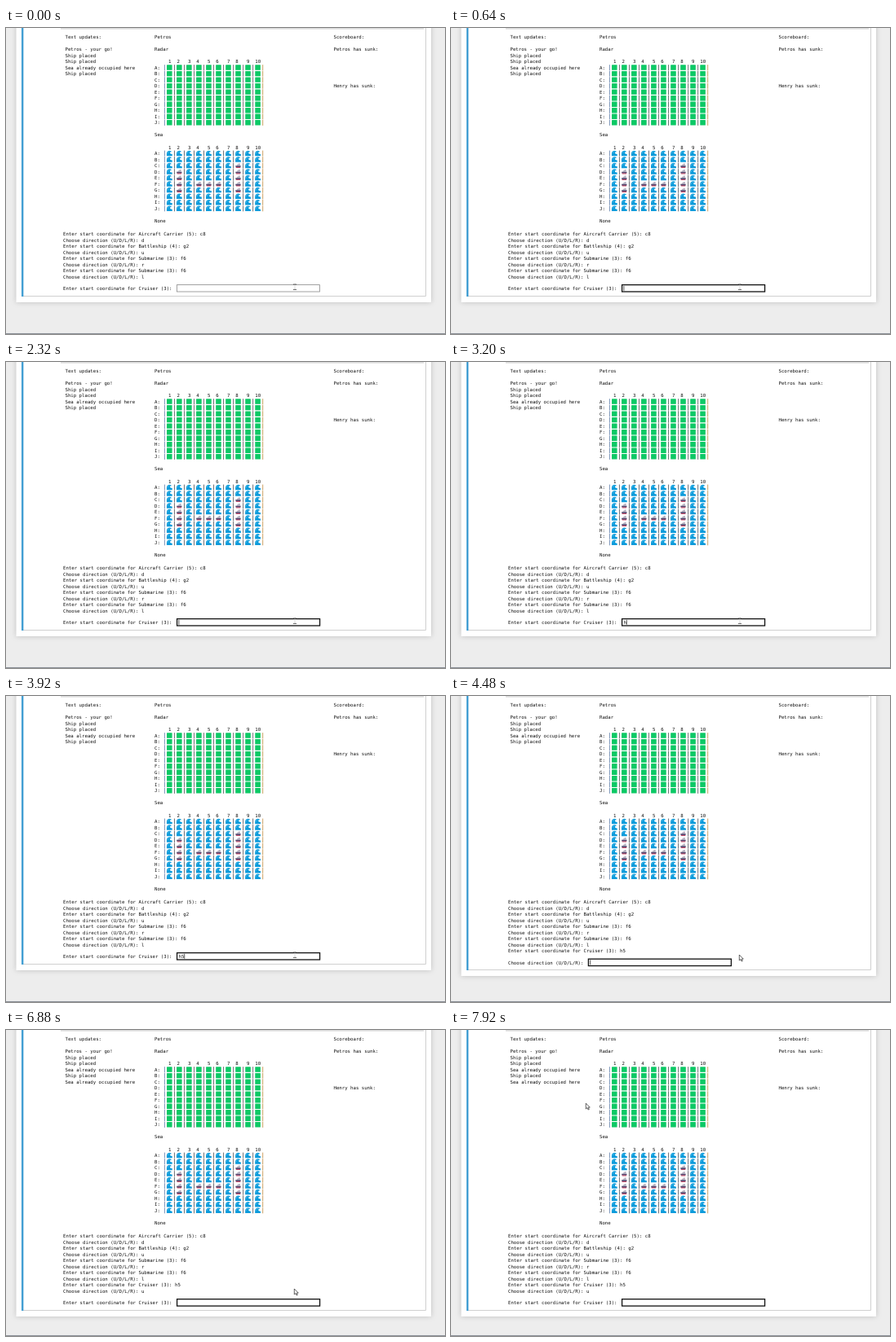
Recreate the animation shown at these times as an HTML page. Size 538 px wide and 376 px high, loop 8 s.

```html
<!DOCTYPE html>
<html>
<head>
<meta charset="utf-8">
<style>
html, body { margin: 0; width: 100%; height: 100%; overflow: hidden; background: #ededed; }
svg { display: block; }
text { font: 5.7px "DejaVu Sans Mono", monospace; white-space: pre; text-rendering: geometricPrecision; fill: #111; }
#panel { fill: #fff; filter: drop-shadow(0 0 3px rgba(87, 87, 87, .3)); }
</style>
</head>
<body>
<svg width="538" height="376" viewBox="0 0 538 376">
  <defs>
    <rect id="square" x="1" y=".9" width="6.6" height="6.4" rx=".5" fill="#0cc965"/>
    <g id="wave">
      <path d="M.9 7.3V4.4Q1.2 1 4.6.8Q6.6.8 7 2.4Q4.9 2 4.9 3.7Q5.2 5.1 7.7 5V7.3Z" fill="#0c9bdb"/>
      <path d="M2.1 4.6Q2.3 2.2 4.4 1.8" fill="none" stroke="#5cc4ee" stroke-width=".6"/>
    </g>
    <g id="ship">
      <path d="M2.3 4.2L3 2.8H4.2L4.6 1.6H6.6V4.2Z" fill="#b5b0c0"/>
      <path d="M.9 4.2H7.7L7 6.4H1.6Z" fill="#55486f"/>
      <path d="M1.4 6H7.2L6.9 7H1.8Z" fill="#d0506c"/>
    </g>
  </defs>
  <rect id="panel" x="12.5" y="-20" width="508.5"/>
  <path id="frame" fill="none" stroke="#d0d0d0"/>
  <rect id="bar" x="19" width="2.4" fill="#439fd3"/>
  <path d="M67 .9H512" stroke="#c8c8c8"/>
  <path d="M0 375.5H538" stroke="#8d9299"/>
  <g id="board"></g>
  <g id="live"></g>
  <g id="beam" fill="none" stroke="#333" stroke-width=".8">
    <path d="M352 315H356M352 321.4H356"/>
    <path d="M354 315V321.4" stroke="#bbb" stroke-width=".5"/>
  </g>
  <path id="arrow" d="M0 0V7L1.7 5.5L2.8 8L4 7.5L2.9 5.1H5Z" fill="#fff" stroke="#222" stroke-width=".7"/>
</svg>
<script>
const $ = id => document.getElementById(id);
const LOOP = 8000, LINE = 7.53, CHAR = 3.432, PITCH = 12.03;
const ROWS = "ABCDEFGHIJ";
const SHIPS = ["C8", "D8", "E8", "F8", "G8", "D2", "E2", "F2", "G2", "F4", "F5", "F6"];
const PLAYER = "Petros", RIVAL = "Henry";
const CRUISER = "Enter start coordinate for Cruiser (3): ";
const DIRECTION = "Choose direction (U/D/L/R): ";

// Key moments in ms
const FOCUS = 320, KEY_H = 2960, KEY_5 = 3520, SENT = 4000, ASK = 4080;
const KEY_U = 5520, SENT_U = 6160, RETRY = 6240;

const text = (x, y, s) => `<text x="${x}" y="${y.toFixed(2)}">${s}</text>`;
const row = n => 13 + n * LINE;
const promptY = n => 255 + n * LINE;

function grid(top, icon) {
  let out = text(182, row(top), "     1  2   3  4   5  6   7  8   9  10");
  [...ROWS].forEach((letter, r) => {
    const y = row(top + 1 + r);
    out += text(182, y, letter + ":");
    for (let c = 0; c <= 10; c++) {
      const x = 194.4 + c * PITCH;
      const color = c == 0 ? "#5a78a8" : c == 10 ? "#c08a3c" : "#4a4a50";
      out += `<path d="M${x} ${y - 5.5}v7" stroke="${color}" stroke-width=".8"/>`;
      if (c < 10) out += `<use href="#${icon(letter + (c + 1))}" x="${x + 1.6}" y="${y - 6.2}"/>`;
    }
  });
  return out;
}

$("board").innerHTML =
  text(72.5, row(0), "Text updates:") +
  [PLAYER + " - your go!", "Ship placed", "Ship placed", "Sea already occupied here", "Ship placed"]
    .map((s, i) => text(72.5, row(2 + i), s)).join("") +
  text(182, row(0), PLAYER) + text(182, row(2), "Radar") + grid(4, () => "square") +
  text(182, row(16), "Sea") + grid(18, id => SHIPS.includes(id) ? "ship" : "wave") +
  text(182, row(30), "None") +
  text(401.5, row(0), "Scoreboard:") +
  text(401.5, row(2), PLAYER + " has sunk:") + text(401.5, row(8), RIVAL + " has sunk:") +
  ["Enter start coordinate for Aircraft Carrier (5): c8", DIRECTION + "d",
   "Enter start coordinate for Battleship (4): g2", DIRECTION + "u",
   "Enter start coordinate for Submarine (3): f6", DIRECTION + "r",
   "Enter start coordinate for Submarine (3): f6", DIRECTION + "l"]
    .map((s, i) => text(70, promptY(i), s)).join("");

function inputRow(label, y, value, focused, caret) {
  const x = 70 + label.length * CHAR + 2.3, tx = x + 2;
  const w = focused ? 1.3 : .8;
  let out = text(70, y, label) +
    `<rect x="${x}" y="${y - 6.4}" width="175" height="8.4" fill="#fff" stroke="${focused ? "#111" : "#8a8a8a"}" stroke-width="${w}"/>` +
    text(tx, y - .2, value);
  if (caret) {
    const cx = tx + .3 + value.length * CHAR;
    out += `<path d="M${cx} ${y - 5.2}v6" stroke="#111" stroke-width=".7"/>`;
  }
  return out;
}

let shown = "";
function draw() {
  const t = performance.now() % LOOP;
  const step = t < SENT ? 0 : t < SENT_U ? 1 : 2;
  const waiting = (t >= SENT && t < ASK) || (t >= SENT_U && t < RETRY);
  const value = step == 0 ? (t < KEY_H ? "" : t < KEY_5 ? "h" : "h5") : step == 1 && t >= KEY_U ? "u" : "";
  const touched = [FOCUS, KEY_H, KEY_5, ASK, KEY_U, RETRY].filter(k => k <= t).pop();
  const focused = t >= FOCUS;
  const caret = focused && (t - touched) % 1000 < 500;

  let live = "";
  if (step > 0) live += text(70, promptY(8), CRUISER + "h5");
  if (step > 1) live += text(70, promptY(9), DIRECTION + "u");
  if (t >= RETRY) live += text(72.5, row(7), "Sea already occupied here");
  if (!waiting) live += inputRow(step == 1 ? DIRECTION : CRUISER, 322 + step * 7.55, value, focused, caret);
  if (live != shown) $("live").innerHTML = shown = live;

  const bottom = Math.round(336.5 + step * 7.6 - (waiting ? 14.5 : 0));
  $("panel").setAttribute("height", bottom + 20);
  $("bar").setAttribute("height", bottom - 7);
  $("frame").setAttribute("d", `M514.5 0V${bottom - 7.5}H21`);

  const k = Math.min(1, Math.max(0, (t - 7280) / 520));
  const ease = k * k * (3 - 2 * k);
  $("beam").style.display = step ? "none" : "";
  $("arrow").style.display = step ? "" : "none";
  $("arrow").setAttribute("transform", `translate(${353.3 - 188 * ease} ${318 - 228 * ease})`);
  requestAnimationFrame(draw);
}
draw();
</script>
</body>
</html>
```
